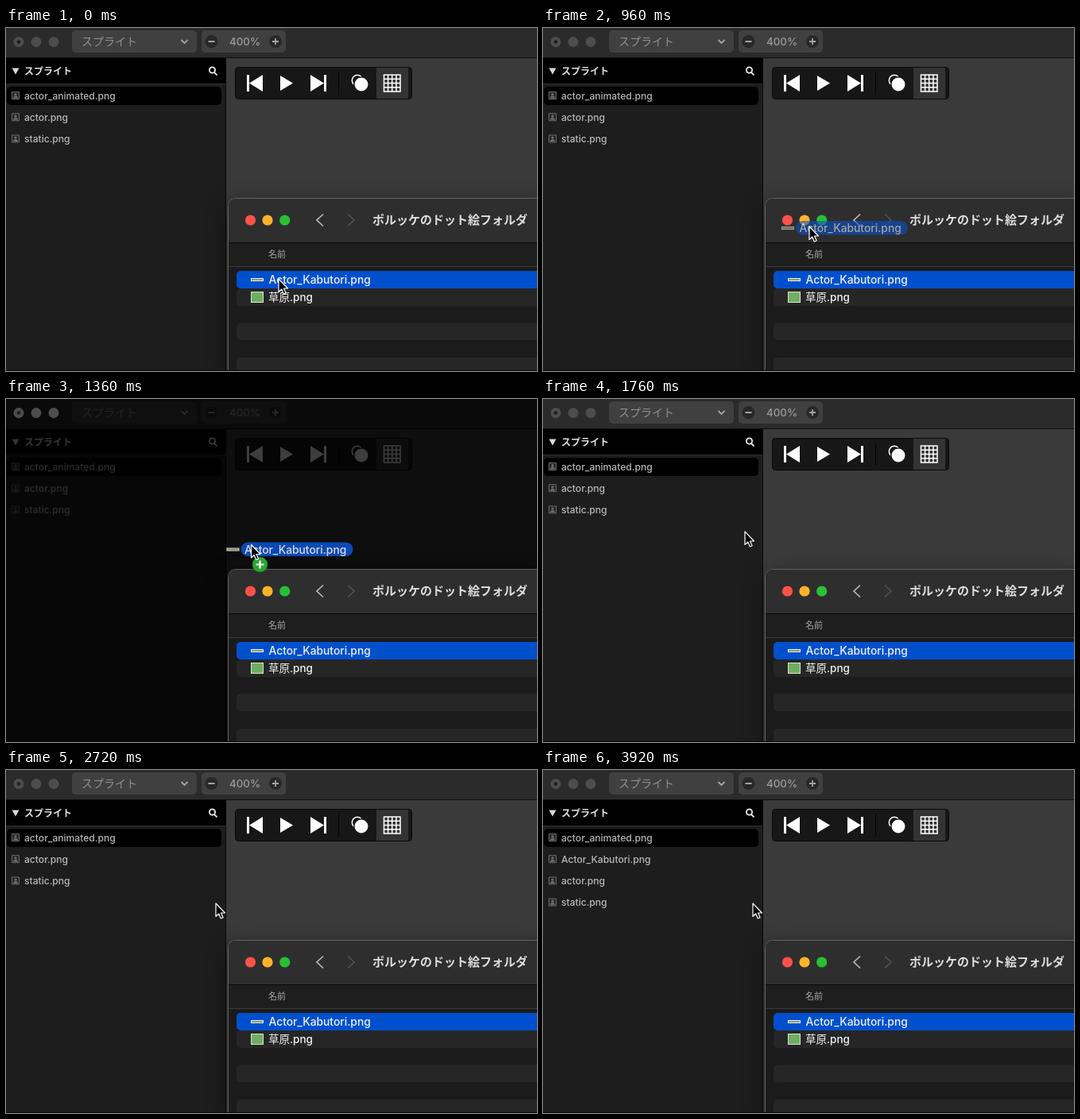
Animation, 668 px wide and 432 px high, one loop 4000 ms. Source, as an HTML page:

```html
<!DOCTYPE html>
<html lang="ja">
<head>
<meta charset="utf-8">
<style>
  html, body { margin: 0; width: 668px; height: 432px; overflow: hidden; background: #1d1d1d; }
  svg { display: block; }
  text { font-family: Inter, "Noto Sans CJK JP", "Noto Sans CJK", sans-serif; white-space: pre; }
  #list text { font-size: 12.1px; font-weight: 500; fill: #b8b8b8; }
  .file { font-size: 13.8px; font-weight: 500; fill: #f2f2f2; }
  .bold { font-weight: 700; fill: #dedede; }
  #finder { filter: drop-shadow(0 8px 14px rgba(0,0,0,.45)); }
</style>
</head>
<body>
<svg width="668" height="432" viewBox="0 0 668 432">
  <defs>
    <g id="strip">
      <rect x="308" y="315" width="16" height="4" fill="#eeeee6"/>
      <rect x="309" y="316" width="14" height="2" fill="#8d9a6c"/>
    </g>
    <g id="avatar" fill="#6c6c6c">
      <path d="M7.500 80.500h9v9h-9z" fill="#242424" stroke="#6c6c6c"/>
      <circle cx="12" cy="83.700" r="1.700"/>
      <path d="M9 88.500q0-3 3-3t3 3z"/>
    </g>
  </defs>

  <!-- editor -->
  <rect width="668" height="432" fill="#1d1d1d"/>
  <rect x="277" y="38" width="391" height="394" fill="#3a3a3a"/>
  <rect width="668" height="38" fill="#2b2b2b"/>
  <rect y="37" width="668" height="1" fill="#101010"/>
  <g fill="#404040">
    <rect x="83" y="3" width="157" height="28" rx="5"/>
    <rect x="246" y="3" width="106" height="28" rx="5"/>
  </g>
  <text x="95" y="22" font-size="14" fill="#8f8f8f">スプライト</text>
  <text x="281" y="21.500" font-size="13.300" font-weight="500" fill="#9b9b9b">400%</text>
  <circle cx="258.500" cy="17" r="8" fill="#282828"/><circle cx="339" cy="17" r="8" fill="#282828"/>
  <path d="M220.500 15l4 4 4-4M254.500 17h8M335 17h8M339 13v8" fill="none" stroke="#a3a3a3" stroke-width="1.800"/>
  <rect y="38" width="276" height="32" fill="#000"/>
  <rect y="70" width="276" height="1" fill="#303030"/>
  <rect x="276" y="38" width="1" height="394" fill="#0a0a0a"/>
  <path d="M7.500 50.500h9l-4.500 8z" fill="#d8d8d8"/>
  <text class="bold" x="23" y="58.500" font-size="12">スプライト</text>
  <g fill="none" stroke="#f0f0f0" stroke-width="1.800"><circle cx="259.500" cy="53" r="3.600"/><path d="M262 55.800l3.500 3.700"/></g>
  <rect x="1" y="74" width="270" height="23" rx="5" fill="#000"/>
  <g id="list"></g>

  <!-- player -->
  <rect x="288.500" y="49.500" width="222" height="40" rx="4" fill="#171717" stroke="#080808"/>
  <rect x="466" y="50" width="40" height="39" fill="#343434"/>
  <rect x="418" y="55" width="1" height="29" fill="#050505"/>
  <path d="M303 59h3v21h-3zM323 59v21l-17-10.500zM345 60l16 9.500-16 9.500zM383 59l17 10.500L383 80zM400 59h3v21h-3z" fill="#fff"/>
  <circle cx="442" cy="66" r="6.700" fill="none" stroke="#fff" stroke-width="1.500"/>
  <circle cx="447" cy="71" r="9.200" fill="#fff" stroke="#171717" stroke-width="1.500"/>
  <path d="M475.500 59h20.500v21h-20.500zM480.600 59v21M485.700 59v21M490.900 59v21M475 64.200h21M475 69.500h21M475 74.700h21" fill="none" stroke="#fff" stroke-width="1.500"/>
  <rect id="shade" width="668" height="432" fill="#000" opacity=".76"/>
  <g fill="#4d4d4d">
    <circle cx="16" cy="17.500" r="6.500"/><circle cx="38" cy="17.500" r="6.500"/><circle cx="60" cy="17.500" r="6.500"/>
    <circle cx="16" cy="17.500" r="2.200" fill="#1c1c1c"/>
  </g>

  <!-- file window -->
  <g id="finder">
    <path d="M680 214.500H290q-10.500 0-10.500 10.500V440H680z" fill="#1b1b1b" stroke="#626262"/>
  </g>
  <path d="M668 215H290q-10 0-10 10v45h388z" fill="#2e2e2e"/>
  <rect x="280" y="270" width="388" height="1" fill="#080808"/>
  <rect x="280" y="271" width="388" height="29" fill="#1e1e1e"/>
  <rect x="280" y="300" width="388" height="1" fill="#3b3b3b"/>
  <circle cx="307.500" cy="242" r="6.600" fill="#fe5148"/>
  <circle cx="329" cy="242" r="6.600" fill="#feb32b"/>
  <circle cx="350.700" cy="242" r="6.600" fill="#28c133"/>
  <g fill="none" stroke-width="1.700">
    <path d="M399 234.500l-8 7.500 8 7.500" stroke="#b8b8b8"/>
    <path d="M430 234.500l8 7.500-8 7.500" stroke="#505050"/>
  </g>
  <text class="bold" x="461" y="247" font-size="15">ポルッケのドット絵フォルダ</text>
  <text x="330" y="289" font-size="11" fill="#a8a8a8">名前</text>
  <rect x="290" y="306" width="400" height="22" rx="5" fill="#0050ce"/>
  <g fill="#262626">
    <rect x="290" y="328" width="400" height="22" rx="5"/>
    <rect x="290" y="371.500" width="400" height="21.500" rx="5"/>
    <rect x="290" y="415" width="400" height="21.500" rx="5"/>
  </g>
  <use href="#strip"/>
  <text class="file" x="330.500" y="322.300">Actor_Kabutori.png</text>
  <rect x="308.500" y="332.500" width="15" height="13" fill="#70ad62" stroke="#d9e6d2"/>
  <text class="file" x="330" y="344" style="font-size:13.5px;font-weight:400">草原<tspan font-weight="500">.png</tspan></text>
  <rect y="431" width="668" height="1" fill="#080808"/>

  <!-- dragged file and pointer -->
  <g id="ghost">
    <use href="#strip"/>
    <rect x="326" y="308" width="141" height="17.500" rx="8.750" fill="#0b50c8"/>
    <text class="file" x="330.500" y="322">Actor_Kabutori.png</text>
  </g>
  <g id="pointer">
    <g id="badge">
      <circle cx="11" cy="25" r="9.500" fill="#2ba532" stroke="#1c7d24" stroke-width=".6"/>
      <path d="M6 25h10M11 20v10" stroke="#fff" stroke-width="2.200"/>
    </g>
    <path d="M0 0v16.500l3.700-3.500 2.600 6 2.800-1.200-2.600-5.800h5z" fill="#000" stroke="#fff" stroke-width="1.200" stroke-linejoin="round"/>
  </g>
</svg>
<script>
const LOOP = 4000, STEP = 80;
const DRAG = 400, BADGE = 1200, DIM = 1360, DROP = 1680, ADDED = 3040;
const files = ['actor_animated.png', 'actor.png', 'static.png'];
const imported = [files[0], 'Actor_Kabutori.png', files[1], files[2]];

// time, pointer x, y, dragged file offset x, y
const path = [
  [400, 343, 316, 0, 0],
  [520, 342, 309, -1, -7],
  [680, 339, 291, -4, -24],
  [960, 335, 250, -8, -65],
  [1280, 322, 198, -18, -111],
  [1360, 308.5, 183.5, -30.5, -127.5],
  [1520, 272, 170, -64, -144],
  [1680, 254, 167, -84, -149],
  [2240, 254, 167, -84, -149],
  [2720, 264, 168, -84, -149]
];
const fade = [[400, .6], [1040, .6], [1280, 1], [1360, .9]];

const $ = id => document.getElementById(id);
const show = (id, on) => $(id).style.display = on ? '' : 'none';
const move = (id, x, y) => $(id).setAttribute('transform', `translate(${x} ${y})`);

function at(keys, t) {
  const i = keys.findIndex(k => k[0] > t);
  if (i < 1) return keys.at(i).slice(1);
  const a = keys[i - 1], b = keys[i], p = (t - a[0]) / (b[0] - a[0]);
  return a.slice(1).map((v, j) => v + (b[j + 1] - v) * p);
}

let shown;
function list(names) {
  if (shown === names) return;
  shown = names;
  $('list').innerHTML = names.map((name, i) =>
    `<g transform="translate(0 ${i * 27.2})"><use href="#avatar"/><text x="23" y="89.5">${name}</text></g>`).join('');
}

function draw(now) {
  const t = Math.floor(now % LOOP / STEP) * STEP;
  const [x, y, gx, gy] = at(path, t);
  const dragging = t >= DRAG && t < DROP;
  move('pointer', x, y);
  move('ghost', gx, gy);
  $('ghost').setAttribute('opacity', at(fade, t)[0]);
  show('ghost', dragging);
  show('badge', dragging && t >= BADGE);
  show('shade', dragging && t >= DIM);
  list(t < ADDED ? files : imported);
}

const start = performance.now();
function tick() {
  draw(performance.now() - start);
  requestAnimationFrame(tick);
}
tick();
</script>
</body>
</html>
```
